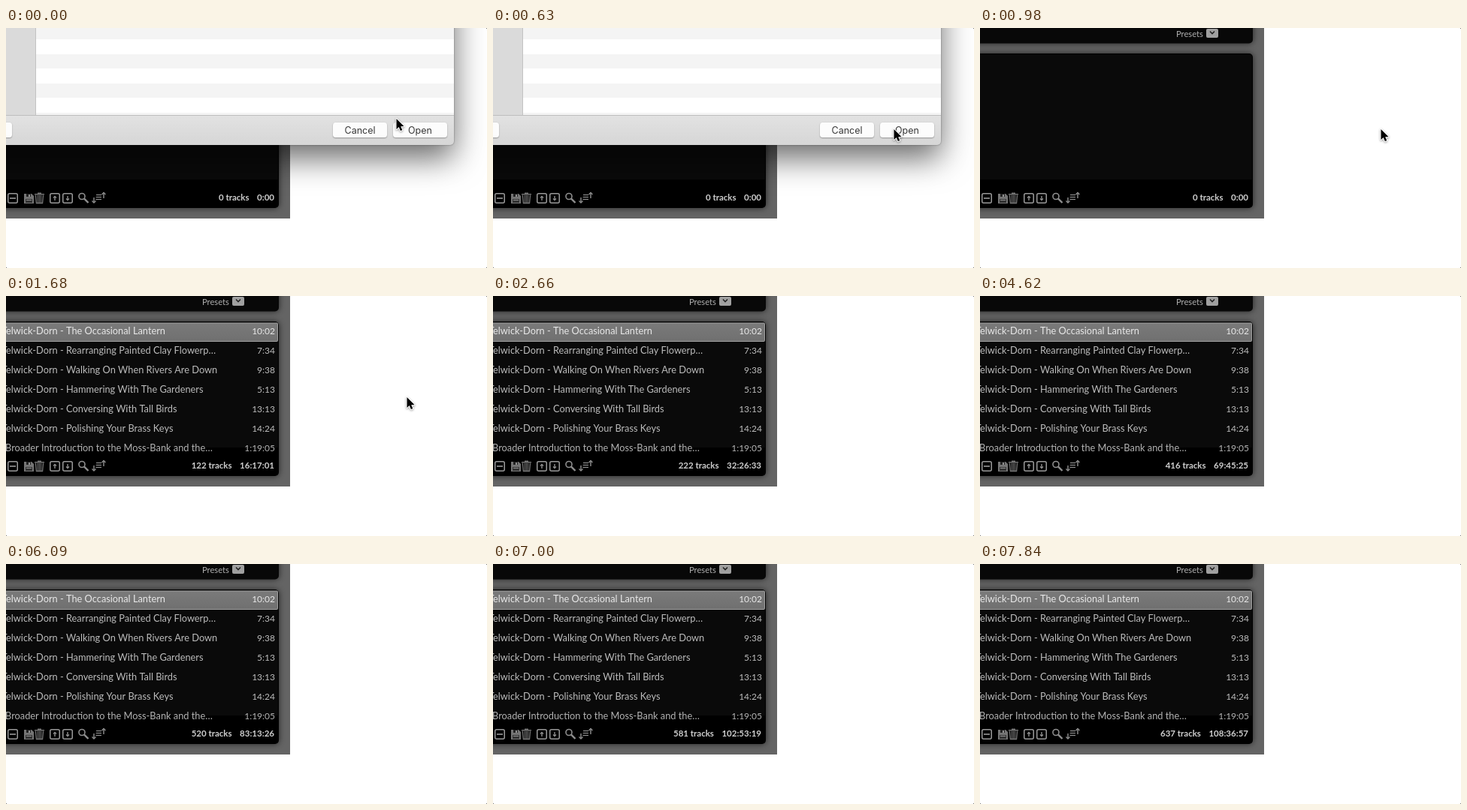
An HTML page with a canvas for the animation above (8 s loop, 640 by 320 pixels).

```html
<!DOCTYPE html>
<html lang="en">
<head>
<meta charset="utf-8">
<title>Adding tracks</title>
<style>
  html, body { margin: 0; width: 100%; height: 100%; overflow: hidden; background: #fff; }
  canvas { display: block; width: 640px; height: 320px; }
</style>
</head>
<body>
<canvas id="stage" width="640" height="320"></canvas>
<script>
const ctx = document.getElementById('stage').getContext('2d');
const LOOP = 8000, TICK = 70;
const DIALOG_CLOSES = 980, LIST_APPEARS = 1260, CURSOR_HIDES = 2520;
const LATO = 'Lato, sans-serif';
const TITLE_FONT = '12.8px ' + LATO, LENGTH_FONT = '12px ' + LATO;

const ARTIST = 'Telwick-Dorn - ';
const ROWS = [
  ['The Occasional Lantern', '10:02'],
  ['Rearranging Painted Clay Flowerp…', '7:34'],
  ['Walking On When Rivers Are Down', '9:38'],
  ['Hammering With The Gardeners', '5:13'],
  ['Conversing With Tall Birds', '13:13'],
  ['Polishing Your Brass Keys', '14:24']
];
const LAST_ROW = ['Broader Introduction to the Moss-Bank and the…', '1:19:05'];

// Bursts of counter updates: first time, number of ticks.
const BURSTS = [
  [1260, 3], [1540, 1], [1680, 1], [1820, 2], [2030, 2], [2450, 4], [3010, 1],
  [3150, 1], [3360, 2], [3640, 6], [4130, 2], [4620, 4], [5110, 3], [5390, 7],
  [5950, 3], [6300, 3], [6580, 3], [6860, 5], [7350, 4], [7700, 3]
];

// Time, tracks, total seconds.
const TOTALS = [
  [1260, 80, 33800], [1680, 122, 58621], [3430, 301, 162500], [3780, 335, 182855],
  [4620, 416, 251125], [5810, 497, 290300], [6090, 520, 299606],
  [6580, 553, 360090], [7840, 637, 391017]
];

function lastUpdate(t) {
  let time = 0;
  for (const [start, count] of BURSTS) {
    if (t < start) break;
    time = start + Math.min(count - 1, Math.floor((t - start) / TICK)) * TICK;
  }
  return time;
}

function totalsAt(t) {
  if (t < LIST_APPEARS) return [0, 0];
  const time = lastUpdate(t);
  let i = 0;
  while (i < TOTALS.length - 2 && time >= TOTALS[i + 1][0]) i++;
  const a = TOTALS[i], b = TOTALS[i + 1];
  const k = Math.min(1, (time - a[0]) / (b[0] - a[0]));
  return [1, 2].map(n => Math.round(a[n] + (b[n] - a[n]) * k));
}

function clock(seconds) {
  const two = n => String(n).padStart(2, '0');
  const h = Math.floor(seconds / 3600), m = Math.floor(seconds / 60) % 60;
  return h ? `${h}:${two(m)}:${two(seconds % 60)}` : `${m}:${two(seconds % 60)}`;
}

function rect(x, y, w, h, fill) {
  ctx.fillStyle = fill;
  ctx.fillRect(x, y, w, h);
}

function round(x, y, w, h, r, fill) {
  ctx.beginPath();
  ctx.roundRect(x, y, w, h, r);
  ctx.fillStyle = fill;
  ctx.fill();
}

function vertical(y0, y1, ...colors) {
  const g = ctx.createLinearGradient(0, y0, 0, y1);
  colors.forEach((c, i) => g.addColorStop(i / (colors.length - 1), c));
  return g;
}

function text(str, x, y, font, fill, align = 'left') {
  ctx.font = font;
  ctx.fillStyle = fill;
  ctx.textAlign = align;
  ctx.fillText(str, x, y);
}

function line(points, color, width = 1.5) {
  ctx.beginPath();
  points.forEach(([x, y]) => ctx.lineTo(x, y));
  ctx.strokeStyle = color;
  ctx.lineWidth = width;
  ctx.stroke();
}

function withShadow(color, blur, dy, draw) {
  ctx.save();
  ctx.shadowColor = color;
  ctx.shadowBlur = blur;
  ctx.shadowOffsetY = dy;
  draw();
  ctx.restore();
}

function clipped(x, y, w, h, draw) {
  ctx.save();
  ctx.beginPath();
  ctx.rect(x, y, w, h);
  ctx.clip();
  draw();
  ctx.restore();
}

function iconBox(x) {
  ctx.beginPath();
  ctx.roundRect(x + .75, 220.75, 12.5, 12.5, 2);
  ctx.strokeStyle = '#999';
  ctx.lineWidth = 1.5;
  ctx.stroke();
}

function arrow(x, top, bottom, up, color, head = 2.5) {
  const tip = up ? top : bottom, back = up ? head : -head;
  line([[x, top], [x, bottom]], color, 1.4);
  line([[x - head, tip + back], [x, tip], [x + head, tip + back]], color, 1.3);
}

function toolbar() {
  const gray = '#909090', dim = '#757575';
  iconBox(2);
  line([[5, 227], [13, 227]], '#999', 1.6);

  // Save
  ctx.beginPath();
  [[24, 221], [34, 221], [37, 224], [37, 234], [24, 234]].forEach(p => ctx.lineTo(...p));
  ctx.fillStyle = dim;
  ctx.fill();
  rect(27, 221, 6, 4, '#222');
  rect(30, 222, 2, 3, gray);
  rect(26, 228, 9, 5, '#333');
  rect(27, 229, 7, 1, gray);

  // Trash
  rect(38, 221, 13, 1.5, dim);
  rect(42, 219.5, 5, 1.5, dim);
  line([[39.5, 223], [40.5, 233.5], [48.5, 233.5], [49.5, 223]], dim, 1.4);
  for (const x of [42.5, 44.5, 46.5]) line([[x, 223], [x, 233]], dim, 1.1);

  iconBox(58);
  arrow(65, 224.5, 230, true, gray, 2);
  iconBox(75);
  arrow(82, 224, 229.5, false, gray, 2);

  // Search
  ctx.beginPath();
  ctx.arc(101, 224.5, 4, 0, Math.PI * 2);
  ctx.strokeStyle = gray;
  ctx.lineWidth = 1.6;
  ctx.stroke();
  line([[104, 227.5], [109.5, 233]], gray, 2.4);

  // Sort
  arrow(117, 226, 233, false, gray);
  [222.5, 225.5, 228.5].forEach((y, i) => line([[120 - i * .3, y], [127, y]], gray, 1.2));
  arrow(130, 219.5, 227, true, gray);
}

function trackList() {
  round(-4, 35.5, 366, 25.5, 2, '#a0a0a0');
  round(-4, 36.5, 365, 23.5, 1, vertical(36, 60, '#7a7a7a', '#707070'));
  clipped(0, 34, 363, 175, () => {
    ROWS.forEach(([title, length], i) => {
      const y = 51 + i * 26, color = i ? '#bcbcbc' : '#e8e8e8';
      text(ARTIST, 80, y, TITLE_FONT, color, 'right');
      text(title, 80, y, TITLE_FONT, color);
      text(length, 358, y, LENGTH_FONT, color, 'right');
    });
    text(LAST_ROW[0], -1, 207, TITLE_FONT, '#b4b4b4');
    text(LAST_ROW[1], 358, 207, LENGTH_FONT, '#b4b4b4', 'right');
  });
}

function player(t) {
  clipped(0, 0, 378, 254, () => {
    rect(0, 0, 378, 254, '#646464');
    withShadow('rgba(0,0,0,.65)', 9, 0, () => {
      round(-20, -40, 383, 60.5, 5, '#080808');
      round(-20, 34, 383, 206, 5, '#000');
    });
    round(-20, 35, 382, 167, [4, 4, 0, 0], '#0a0a0a');
  });
  text('Presets', 261, 11.7, '11.2px ' + LATO, '#b0b0b0');
  round(301, 1, 16, 12, 2, '#a0a0a0');
  line([[306, 4.5], [309, 7.5], [312, 4.5]], '#222', 1.6);

  if (t >= LIST_APPEARS) trackList();
  toolbar();

  const [tracks, seconds] = totalsAt(t);
  const font = 'bold 11.5px ' + LATO, total = clock(seconds);
  text(total, 357, 230, font, '#d0d0d0', 'right');
  const left = 357 - ctx.measureText(total).width;
  text(tracks + ' tracks', left - 10.5, 230, font, '#d0d0d0', 'right');
}

function button(x, label, pressed) {
  withShadow('rgba(0,0,0,.4)', 1.5, .7, () => {
    round(x, 126, 72, 20, 3.5, pressed ? vertical(126, 146, '#a4a4a8', '#808086') : '#fcfcfc');
  });
  text(label, x + 36, 141, '12.5px Inter, sans-serif', pressed ? '#fff' : '#383838', 'center');
}

function dialog(t) {
  withShadow('rgba(0,0,0,.58)', 42, 18, () => round(-300, -300, 896, 456, 5, '#ddd'));
  withShadow('rgba(0,0,0,.5)', 2, 0, () => {
    round(-300, -300, 896, 456, 5, vertical(117, 156, '#e2e2e2', '#d6d6d6'));
  });
  rect(0, 0, 39, 116, '#dadada');
  rect(39, 0, 1, 116, '#c2c2c2');
  rect(40, 0, 556, 116, '#fff');
  clipped(40, 0, 556, 116, () => {
    for (let y = -4; y < 116; y += 39) rect(40, y, 556, 19, '#f4f4f4');
  });
  rect(0, 116, 596, 1, '#bebebe');
  button(-64, '', false);
  button(435, 'Cancel', false);
  button(515, 'Open', t >= 490 && t < 630);
}

function cursor(t) {
  const k = Math.min(5, Math.floor(t / TICK)) / 5;
  const ease = k * k * (3 - 2 * k);
  const shape = [[0, 0], [0, 14], [3.2, 11], [5.4, 16], [7.8, 15], [5.7, 10.2], [10, 10]];
  ctx.save();
  ctx.translate(519.5 + 14 * ease, 121 + 14 * ease);
  ctx.beginPath();
  shape.forEach(p => ctx.lineTo(...p));
  ctx.closePath();
  ctx.lineJoin = 'round';
  ctx.strokeStyle = '#fff';
  ctx.lineWidth = 2;
  withShadow('rgba(0,0,0,.4)', 3, 1, () => ctx.stroke());
  ctx.fillStyle = '#000';
  ctx.fill();
  ctx.restore();
}

function draw(t) {
  rect(0, 0, 640, 320, '#fff');
  player(t);
  if (t < DIALOG_CLOSES) dialog(t);
  if (t < CURSOR_HIDES) cursor(t);
  for (const [x, y] of [[639, 0], [0, 319], [639, 319]]) rect(x, y, 1, 1, '#777');
}

function loop() {
  draw(performance.now() % LOOP);
  requestAnimationFrame(loop);
}
loop();
</script>
</body>
</html>
```
